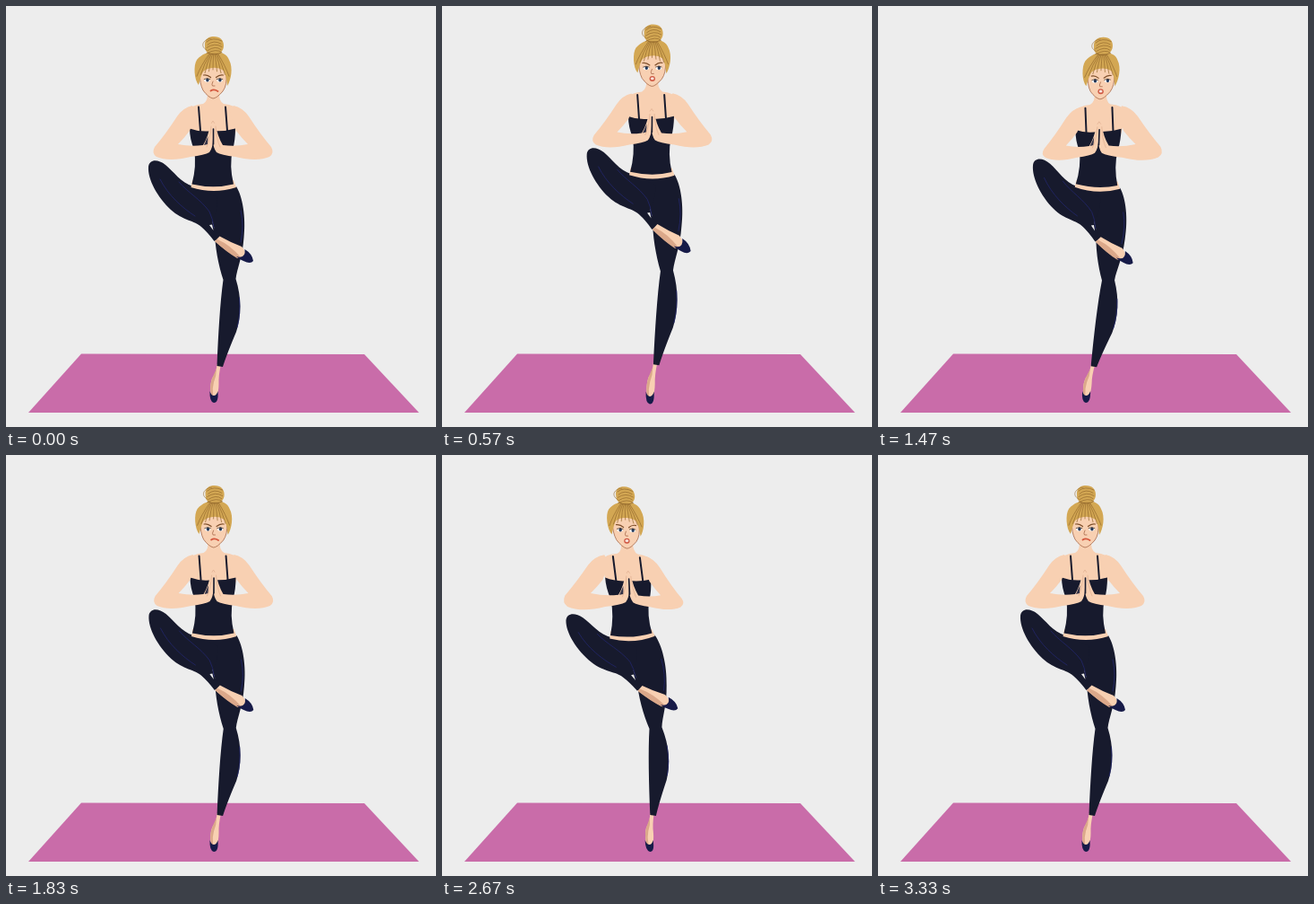
Write an HTML page with a canvas that moves like this. It is 480 px wide and 469 px high and loops after 3.36 s.

```html
<!DOCTYPE html>
<html lang="en">
<head>
<meta charset="utf-8">
<title>Tree pose</title>
<style>
  html, body { margin: 0; width: 100%; height: 100%; overflow: hidden; background: #ededed; }
  canvas { display: block; }
</style>
</head>
<body>
<canvas id="stage" width="480" height="469"></canvas>
<script>
const ctx = document.getElementById('stage').getContext('2d');
const LOOP = 3360;
const NAVY = '#171a2d', SEAM = '#22266b', SKIN = '#f8d0b2', SHADE = '#dba88a';
const HAIR = '#d3a753', STRAND = '#94692d', SHOE = '#171b48', LINE = '#a8694a';

// [time, value] keys, eased between
const LIFT = [[0, 0], [430, 16], [1000, 0], [1850, 0], [2250, 14.5], [2620, 0], [LOOP, 0]];
const LEAN = [[0, 0], [400, 0], [1160, 21], [1900, 0], [2230, 0], [2620, -19.5], [3290, 0], [LOOP, 0]];

let lift = 0, lean = 0;

const clamp = v => Math.max(0, Math.min(1, v));

function valueAt(keys, t) {
  const i = keys.findIndex(k => k[0] > t);
  const [t0, v0] = keys[i - 1], [t1, v1] = keys[i];
  return v0 + (v1 - v0) * (1 - Math.cos(Math.PI * (t - t0) / (t1 - t0))) / 2;
}

// Bends the figure around the planted foot; h is 0 at the toe and 1 at the hip
function warp(x, y, part) {
  const h = (440 - y) / 236;
  const side = x - 232;
  const twist = part === 'leg' ? 0.003 * clamp(h * 3) : -0.002 + 0.005 * clamp((y - 150) / 50);
  const spread = part === 'arm' ? 0.36 * clamp(Math.abs(side) / 66) : 0;
  return [
    x + lean * (Math.min(h, 1) + Math.max(h - 1, 0) * 0.66 + spread),
    y - lift * Math.min(1, 1.4 * h - 0.1) + lean * twist * side + Math.abs(lean) * 0.06 * clamp(h)
  ];
}

function bend(d, part) {
  return new Path2D(d.replace(/([\d.]+),([\d.]+)/g, (_, x, y) => warp(+x, +y, part).join(' ')));
}

function fill(color, d, part) {
  ctx.fillStyle = color;
  ctx.fill(bend(d, part));
}

function line(color, width, d, part) {
  ctx.strokeStyle = color;
  ctx.lineWidth = width;
  ctx.stroke(bend(d, part));
}

function dot(color, x, y, rx, ry = rx) {
  ctx.fillStyle = color;
  ctx.beginPath();
  ctx.ellipse(...warp(x, y), rx, ry, 0, 0, 7);
  ctx.fill();
}

function drawMat() {
  ctx.fillStyle = '#ededed';
  ctx.fillRect(0, 0, 480, 469);
  ctx.fillStyle = '#c96ca9';
  ctx.fill(new Path2D('M84 387.5L400 388L461 453H25Z'));
}

function drawLegs() {
  // planted foot
  fill(SKIN, 'M235.5,399L240,399Q237,412 237.5,421Q237.5,430 235,435L229,434Q227,424 230,415Q235,408 235.5,399Z', 'leg');
  fill(SHADE, 'M235,404Q235,412 232,419Q230,426 231,434L229,434Q227,424 230,415Z', 'leg');
  fill(SHOE, 'M227.5,429Q229,434 232,434Q235,434 236.5,429Q237.5,442 232,442Q227,441 227.5,429Z', 'leg');
  // standing leg
  fill(NAVY, 'M207,201Q232,209 257,201C264,212 268,235 265.5,258C264,280 258,292 256.5,304' +
    'C263,325 263,345 257,363Q246,389 242,402L235.5,401C237,365 239,330 242.5,305C237,288 233,268 233,249L224,220Z', 'leg');
  // raised leg
  fill(NAVY, 'M209,201C195,197 187,184 178,177C169,170 160,171 159,179C158,193 169,213 184,227' +
    'C197,239 211,239 218,246Q225,252 232.5,262L239,257Q232,249 230,239Q236,232 236,213Z', 'leg');
  fill('#ededed', 'M227,244L230,243.5L231.5,250Z', 'leg');
  line(SEAM, 0.8, 'M193,196C203,208 217,215 227,229Q231,237 232,247', 'leg');
  line(SEAM, 0.8, 'M172,193C181,211 197,225 211,234', 'leg');
  line(SEAM, 0.8, 'M262,228Q266,245 262,263', 'leg');
  line(SEAM, 0.8, 'M260.5,325Q262,344 258,358', 'leg');
  // raised foot
  fill(SKIN, 'M238.5,256.5Q250,263 263,268Q268,273 267,280L259,281Q247,274 233,262Z', 'leg');
  fill(SHADE, 'M236,260Q250,266 262,280L258,281Q246,274 233,262Z', 'leg');
  fill(SHOE, 'M266.5,271Q275,276 276,284Q273,288 265,284Q260,282 257,279Q268,282 266.5,271Z', 'leg');
}

function drawTorso() {
  fill(SKIN, 'M225,94L238,94Q237,106 243,109Q256,110 261,118L256,142L206,142L201,118Q207,110 220,109Q226,106 225,94Z');
  fill(SKIN, 'M208,194L254,194L257,202Q232,210 206.5,202Z');
  fill(NAVY, 'M205,136.5Q217,141 231,139Q244,140 256,136.5Q256,150 253,160Q249,178 254,198.5Q232,204 207.5,198.5Q213,178 210,160Q205,148 205,136.5Z');
  line(NAVY, 2, 'M215,112.5L217,139');
  line(NAVY, 2, 'M245,112.5L247,139');
  line(SHADE, 0.6, 'M229,131L231,128L233,131');
}

function drawArms() {
  const arm = 'M208,111Q198,113 191,123Q178,143 166,157Q162,164 168,168Q182,174 206,168Q222,166 227,163' +
    'Q231,158 231,148L231.5,135Q229,128 228,132Q226,145 220,155Q206,157 192,154Q199,147 205,139L212,120Z';
  const mirrored = arm.replace(/([\d.]+),/g, (_, x) => 462 - x + ',');
  for (const d of [arm, mirrored]) fill(SKIN, d, 'arm');
  fill('#353448', 'M221,155L225.5,145L225,154Z', 'arm');
  line(NAVY, 1.6, 'M231.5,137L231.5,154', 'arm');
  line(SHADE, 0.6, 'M229,134Q228,149 224,157', 'arm');
  line(SHADE, 0.6, 'M234,134Q235,149 239,157', 'arm');
}

function drawHair() {
  fill(HAIR, 'M222,45C221,36 227,34 232,34C239,34 243,38 243,44C243,51 238,54 232,54C226,54 222,51 222,45Z');
  fill(HAIR, 'M215,88C210,82 209,66 213,60C219,53 226,51 232,51C241,51 247,54 249,60C254,69 251,83 247,89' +
    'Q246,77 243,72Q237,68 230,69Q221,70 219,75Q217,80 215,88Z');
  for (let i = 0; i < 9; i++) {
    const x = 213 + i * 4.5, y = 71 + Math.abs(i - 4) * 1.8;
    line(STRAND, 0.7, `M${x},${y}Q${x + 4 - i},${y - 11} ${227 + i * 1.2},53`);
  }
  for (let i = 0; i < 5; i++) {
    const y = 38 + i * 3.2;
    line(STRAND, 0.7, `M${224 + i % 2},${y + 2}Q${231 + i},${y - 4} ${241 - i % 2},${y + 1}`);
  }
  line(STRAND, 0.6, 'M224,49C216,45 220,37 229,36');
  line(STRAND, 0.8, 'M225,52Q232,56 240,52');
}

function drawHead() {
  const face = 'M216.5,76Q217,67 231,66Q246,67 246,76Q247,88 242,95Q235,103 231,103Q226,102 220,94Q216,86 216.5,76Z';
  fill(SKIN, face);
  line(LINE, 0.8, face);
  drawHair();
  for (const [x, dir] of [[224.5, 1], [238.5, -1]]) {
    line('#80502b', 1.2, `M${x - 4 * dir},77Q${x},76 ${x + 4 * dir},79.5`);
    dot('#fff', x, 82.5, 3.2, 2.2);
    dot('#24395a', x + 0.4, 82.5, 1.7, 2.1);
    line('#4a3020', 0.8, `M${x - 3.3},81.5Q${x},79.5 ${x + 3.3},81.5`);
  }
  line(LINE, 0.8, 'M231,84Q229,88 230.5,89L233,89');

  const effort = clamp(lift / 12 + Math.abs(lean) / 14);
  if (effort < 0.5) {
    line('#d4573d', 1.8, 'M228.5,94.5Q232,92 236.5,95');
  } else {
    dot('#cf5a45', 231.5, 94.5, 3.2, 3);
    dot('#f7e3dc', 231.5, 94.3, 1.9, 1.5);
  }
}

function frame(now) {
  const t = now % LOOP;
  lift = valueAt(LIFT, t);
  lean = valueAt(LEAN, t);
  drawMat();
  drawLegs();
  drawTorso();
  drawArms();
  drawHead();
  requestAnimationFrame(() => frame(performance.now() - start));
}

ctx.lineCap = 'round';
const start = performance.now();
frame(0);
</script>
</body>
</html>
```
